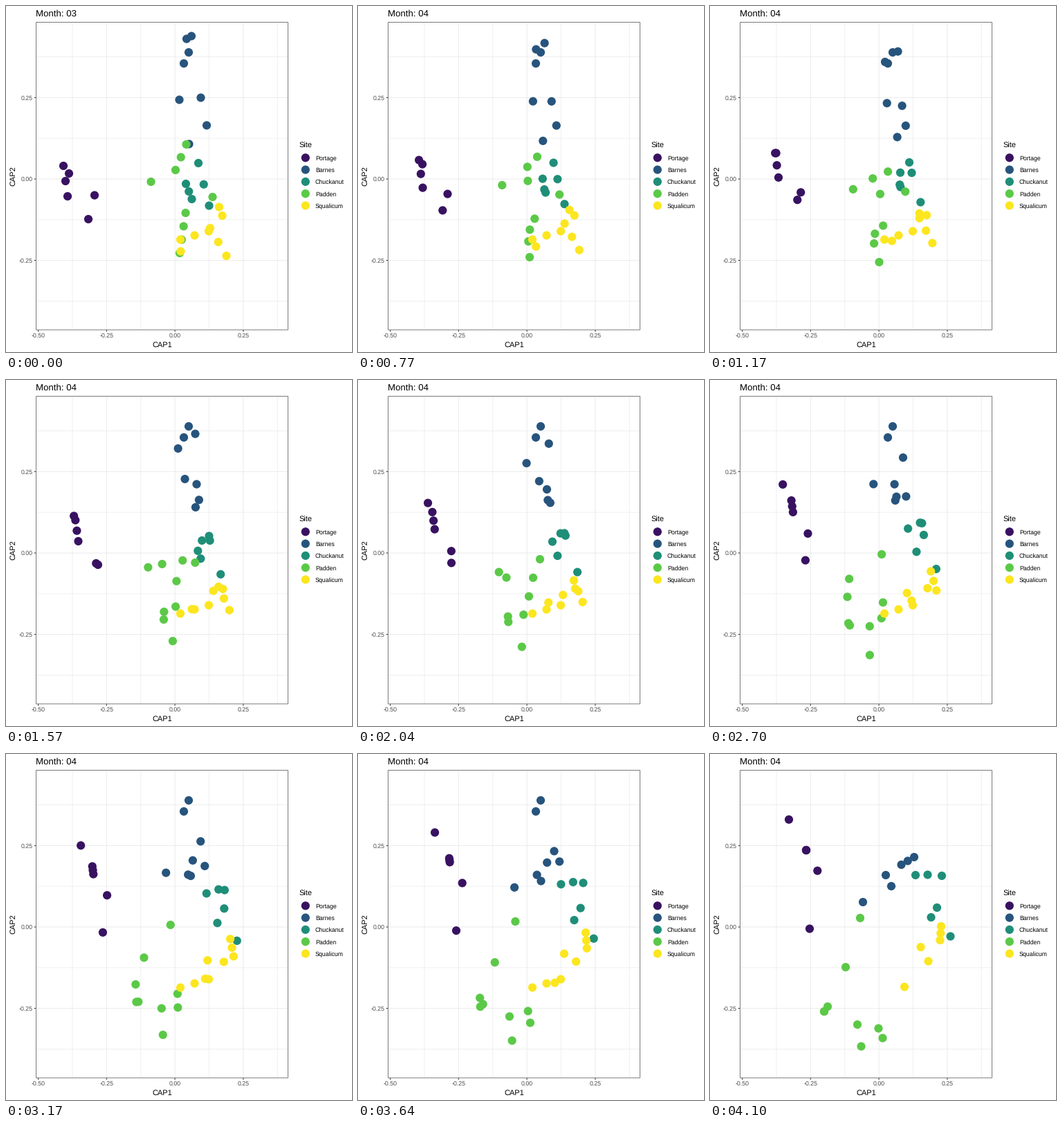
A matplotlib script that plays this animation: 500x500 px, repeating every 8000 ms.

```python
import matplotlib as mpl
import matplotlib.pyplot as plt
import numpy as np
from matplotlib.animation import FuncAnimation
from matplotlib.patches import Rectangle

mpl.rcParams["font.family"] = "Liberation Sans"
mpl.rcParams["text.hinting"] = "none"

SIZE, DPI = 500, 100
PT = 72 / DPI  # points per pixel
LOOP, TICK = 8000, 20
START, STEP, STEPS = 500, 200 / 3, 55

LEFT, RIGHT, TOP, BOTTOM = 43.5, 407.5, 23.5, 468
X0, Y0, X_UNIT, Y_UNIT = 244.1, 250, 395, 470.6

COLOURS = {
    "Portage": "#381261",
    "Barnes": "#27547d",
    "Chuckanut": "#1f8e78",
    "Padden": "#5bc947",
    "Squalicum": "#fce61f",
}

# Each strand is some dots spread evenly over a line through key points:
# (number of dots, line at the start, line at the end).
# Strands without an end stay put and vanish when the move is over.
STRANDS = {
    "Portage": [
        (3, [(83, 231), (89, 275)], [(139, 139)]),
        (3, [(91, 242), (119, 308), (128, 273.5)],
         [(114, 94.7), (155.3, 168.7), (144, 252.5)]),
    ],
    "Barnes": [
        (2, [(264, 67), (257, 83)], None),
        (3, [(250.5, 135.5), (268, 43.5), (264.5, 199.5)],
         [(276.5, 160), (295, 149)]),
        (3, [(261, 47.5), (281.5, 132.5), (290, 172.5)],
         [(221, 214), (262, 191), (254, 175)]),
    ],
    "Chuckanut": [
        (3, [(278, 227), (293.5, 288.5)],
         [(328, 222), (314.5, 174.5), (347.5, 263.5)]),
        (3, [(260, 257), (268.5, 279)],
         [(335, 176), (319.5, 236), (297, 175)]),
    ],
    "Padden": [
        (3, [(260.5, 200), (245, 237)],
         [(243.5, 396.5), (165, 372), (249.5, 410.5)]),
        (2, [(209.5, 254), (298.5, 276)], [(196, 308), (217, 237)]),
        (4, [(259.5, 299), (251, 357)],
         [(213, 391), (165, 372), (170, 365), (218.5, 422.5)]),
    ],
    "Squalicum": [
        (3, [(252, 337.5), (293, 325.5)], None),
        (3, [(308, 290.5), (312.5, 303), (252.5, 354.5)],
         [(281, 336.5), (315.5, 299.5), (304.5, 279)]),
        (3, [(295, 321), (318.5, 361)], [(334, 249), (332.5, 269)]),
    ],
}

fig = plt.figure(figsize=(SIZE / DPI, SIZE / DPI), dpi=DPI, facecolor="white")
ax = fig.add_axes([0, 0, 1, 1])
ax.set(xlim=(0, SIZE), ylim=(SIZE, 0))
ax.axis("off")


def strand(n, keys):
    t, knots = np.linspace(0, 1, n), np.linspace(0, 1, len(keys))
    return np.column_stack([np.interp(t, knots, axis) for axis in zip(*keys)])


def line(xs, ys, colour, width, z=1):
    ax.plot(xs, ys, color=colour, lw=width * PT, zorder=z, snap=False,
            solid_capstyle="butt")


def label(x, y, text, size, colour="black", **kw):
    return ax.text(x, y, text, fontsize=size * PT, color=colour,
                   va="baseline", zorder=5, **kw)


def dots(points, colours):
    xs, ys = zip(*points)
    return ax.scatter(xs, ys, s=(12.2 * PT) ** 2, c=colours,
                      linewidths=0, zorder=3)


def draw_panel():
    grid, dark, grey = "#ebebeb", "#333333", "#4d4d4d"
    for i in range(-4, 4):
        value = i / 8
        major = i % 2 == 0
        width, z = (1.07, 2) if major else (0.75, 1)
        x, y = X0 + value * X_UNIT, Y0 - value * Y_UNIT
        if i > -4:
            line([x, x], [TOP, BOTTOM], grid, width, z)
            line([LEFT, RIGHT], [y, y], grid, width, z)
        if major:
            line([x, x], [BOTTOM, BOTTOM + 2.75], dark, 1.07)
            label(x, 479.4, f"{value:.2f}", 8.8, grey, ha="center")
        if major and i > -4:
            line([LEFT - 2.75, LEFT], [y, y], dark, 1.07)
            label(38.6, y + 3.2, f"{value:.2f}", 8.8, grey, ha="right")
    ax.add_patch(Rectangle((LEFT, TOP), RIGHT - LEFT, BOTTOM - TOP, fill=False,
                           ec="#7a7a7a", lw=PT, zorder=4, snap=False))
    label(225.5, 493, "CAP1", 11, ha="center")
    label(13.4, 246, "CAP2", 11, ha="center", rotation=90,
          rotation_mode="anchor")


def draw_legend():
    label(424, 204.5, "Site", 11)
    keys = [(432.8, 219.3 + 17.28 * i) for i in range(len(COLOURS))]
    dots(keys, list(COLOURS.values()))
    for (_, y), name in zip(keys, COLOURS):
        label(446.8, y + 3.4, name, 8.8)


def build_dots():
    begin, end, leaving, colours = [], [], [], []
    for site, strands in STRANDS.items():
        for n, first, last in strands:
            begin.append(strand(n, first))
            end.append(strand(n, last or first))
            leaving += [last is None] * n
            colours += [COLOURS[site]] * n
    return np.vstack(begin), np.vstack(end), np.array(leaving), colours


draw_panel()
draw_legend()
title = label(43.3, 15.2, "Month: 03", 13.2)
begin, end, leaving, colours = build_dots()
cloud = dots(begin, colours)


def update(i):
    elapsed = i * TICK + TICK / 2 - START
    step = int(np.clip(elapsed // STEP + 1, 0, STEPS))
    pos = begin + (end - begin) * step / STEPS
    if step == STEPS:
        pos[leaving] = -50  # off the stage
    cloud.set_offsets(pos)
    title.set_text("Month: 04" if step else "Month: 03")
    return cloud, title


anim = FuncAnimation(fig, update, frames=LOOP // TICK, interval=TICK,
                     repeat=True, repeat_delay=0, blit=False)
plt.show()
```
